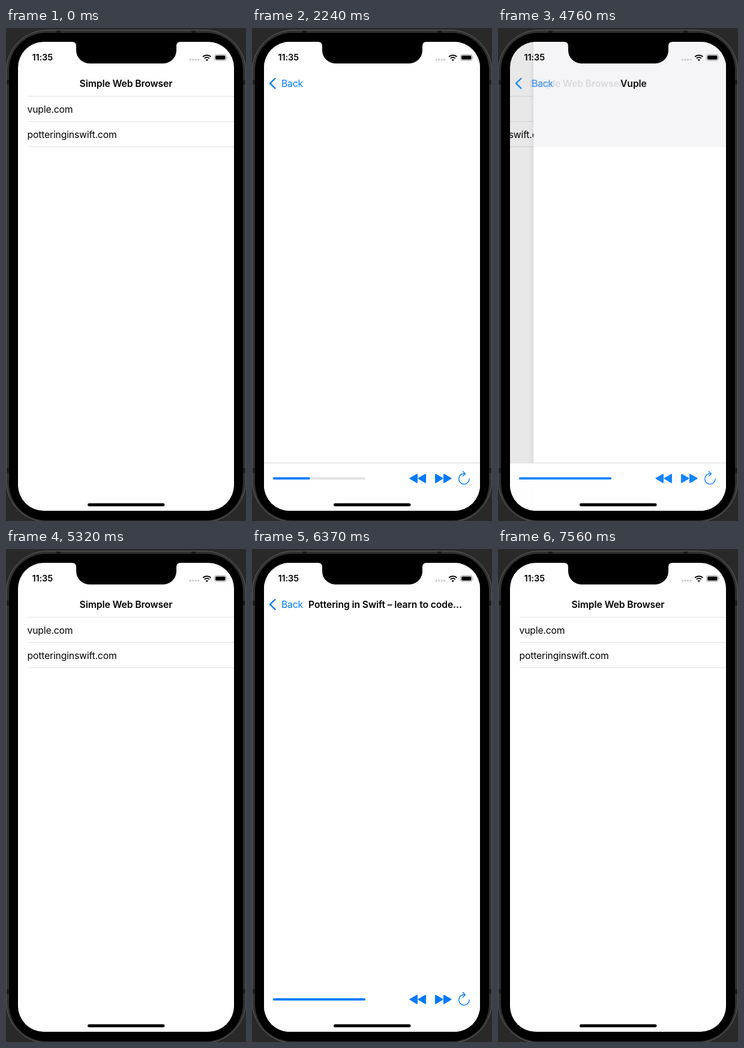
An HTML page that plays this animation: 400 px wide and 820 px high, repeating every 7840 ms.

```html
<!DOCTYPE html>
<html lang="en">
<head>
<meta charset="utf-8">
<title>Simple Web Browser</title>
<style>
  html, body { margin: 0; width: 100%; height: 100%; overflow: hidden; background: #292929; }
  svg { display: block; width: 400px; height: 820px; }
  text { font: 15.7px Inter, "Open Sans", sans-serif; letter-spacing: -.15px; }
  .title { font-weight: 600; letter-spacing: -.1px; }
  .blue { fill: #007aff; }
  .line { stroke: #007aff; fill: none; stroke-linecap: round; stroke-linejoin: round; }
  .rule { fill: #e3e3e5; }
  .h1 { font-size: 44px; font-weight: 700; letter-spacing: -.6px; }
  .lead { font-size: 23px; letter-spacing: -.55px; }
  .brand { font-size: 14.2px; letter-spacing: 0; }
</style>
</head>
<body>
<svg viewBox="0 0 400 820">
  <defs>
    <clipPath id="screen"><rect x="20" y="23" width="360" height="780" rx="43"/></clipPath>
    <clipPath id="photo"><rect x="35" y="615" width="330" height="188"/></clipPath>
    <linearGradient id="night" x2="0" y2="1">
      <stop stop-color="#11161f"/><stop offset=".3" stop-color="#0a2039"/><stop offset="1" stop-color="#0a4687"/>
    </linearGradient>
    <linearGradient id="shade">
      <stop stop-opacity="0"/><stop offset="1" stop-opacity=".05"/>
    </linearGradient>
  </defs>

  <!-- Phone body -->
  <rect width="400" height="820" fill="#292929"/>
  <rect x=".5" y="3.5" width="399" height="818" rx="68" fill="#303030" stroke="#606060"/>
  <path d="M84 4h7v4h-7zM309 4h7v4h-7zM1 86h4v8H1zM395 86h4v8h-4zM1 732h4v8H1zM395 732h4v8h-4z" fill="#1b1b1b"/>
  <rect x="5" y="8" width="390" height="811" rx="62"/>

  <g clip-path="url(#screen)">
    <rect x="20" y="23" width="360" height="780" fill="#fff"/>

    <g id="list">
      <rect class="rule" x="36" y="113" width="344" height="1"/>
      <rect class="rule" x="36" y="155" width="344" height="1"/>
      <rect class="rule" x="36" y="197" width="344" height="1"/>
      <rect id="selection" x="20" width="360" height="43" fill="#d1d1d6"/>
      <text x="35.5" y="140.5">vuple.com</text>
      <text x="35.5" y="182.5">potteringinswift.com</text>
    </g>
    <rect id="dim" x="20" y="23" width="360" height="780"/>

    <g id="page">
      <rect x="12" y="23" width="8" height="780" fill="url(#shade)"/>
      <rect x="20" y="23" width="360" height="780" fill="#fff"/>
      <rect id="siteOne" x="20" y="23" width="360" height="175" fill="#f5f5f7"/>
      <g id="siteTwo">
        <rect x="20" y="23" width="360" height="90" fill="#fafafa"/>
        <rect x="20" y="173" width="360" height="630" fill="url(#night)"/>
        <rect x="20" y="113" width="360" height="61" fill="#b22024"/>
        <rect x="35" y="133" width="24.5" height="11" fill="#1560bd"/>
        <rect x="35" y="144" width="24.5" height="11" fill="#ffd60a"/>
        <g fill="#fff">
          <text class="brand" x="63.5" y="149"><tspan font-weight="700">POTTERING</tspan><tspan font-weight="300"> IN </tspan><tspan font-weight="700">SWIFT</tspan></text>
          <g id="copy"></g>
          <text x="127.5" y="560" style="font-size:19.5px">Search the site</text>
        </g>
        <g fill="none" stroke="#fff" stroke-width="1.3">
          <rect x="76" y="530.5" width="249" height="46" rx="23"/>
          <circle cx="100.5" cy="551.5" r="5.8"/>
          <path d="M104.7 556l5 5"/>
        </g>
        <g clip-path="url(#photo)">
          <rect x="35" y="615" width="330" height="188" fill="#cfae90"/>
          <path d="M35 640h330M35 672h330M35 706h330" stroke="#b9977a"/>
          <path d="M35 648l22 12v50H35z" fill="#8a5a2c"/>
          <path d="M42 640l25 55" stroke="#26364f" stroke-width="5"/>
          <path d="M35 615h82l-16 12 20 4-26 5 7 16-20-10-8 14-8-16-19 9 7-16-19 4z" fill="#22391f"/>
          <path d="M157 633l24-18h184v108H235z" fill="#8f8d8c"/>
          <path d="M181 633l20-18h164v96H245z" fill="#333336"/>
          <path d="M97 677l34-22 52 66-36 30z" fill="#fff" stroke="#202022" stroke-width="4" stroke-linejoin="round"/>
          <circle cx="142" cy="704" r="16" fill="#c1272d"/>
          <ellipse cx="64" cy="730" rx="34" ry="18" fill="#ece7e2"/>
        </g>
      </g>
    </g>

    <!-- Navigation bar -->
    <text id="listTitle" class="title" x="200" y="98" text-anchor="middle">Simple Web Browser</text>
    <path id="chevron" class="line" d="M38.5 84l-8.5 8.2 8.5 8.2" stroke-width="2.3"/>
    <text id="back" class="blue" x="49" y="98">Back</text>
    <text id="pageTitle" class="title" y="98"></text>

    <g id="toolbar">
      <rect x="20" y="723" width="360" height="80" fill="#fff" fill-opacity=".95"/>
      <rect id="toolbarRule" x="20" y="723" width="360" height="1" fill="#d9d9db"/>
      <g id="tools">
        <rect x="35" y="747.3" width="154" height="3.7" rx="1.85" fill="#e1e1e4"/>
        <rect id="bar" class="blue" x="35" y="747.3" height="3.7" rx="1.85"/>
        <path class="line" style="fill:#007aff" stroke-width="2" d="M275 742.5v13.5l-11.5-6.8zM289 742.5v13.5l-11.5-6.8zM306 742.5v13.5l11.5-6.8zM320 742.5v13.5l11.5-6.8z"/>
        <path class="line" stroke-width="1.4" d="M354.5 741.3a8.7 8.7 0 1 0 7.6 8.6M351.5 737.5l4 3.9-4 3.9"/>
      </g>
    </g>

    <!-- Status bar -->
    <text class="title" x="43.5" y="54.3" style="font-size:14.5px">11:35</text>
    <g fill="#c8c8ca">
      <circle cx="307.3" cy="52.7" r="1.6"/><circle cx="311.8" cy="52.7" r="1.6"/>
      <circle cx="316.3" cy="52.7" r="1.6"/><circle cx="320.8" cy="52.7" r="1.6"/>
    </g>
    <path d="M328.2 47.7a9.8 9.8 0 0 1 13.2 0M330.8 50.6a6 6 0 0 1 8 0" fill="none" stroke="#000" stroke-width="2"/>
    <path d="M332.5 52.7q2.3-1.6 4.6 0l-2.3 2.3z"/>
    <rect x="347.5" y="44.2" width="19.5" height="9.8" rx="3" fill="none" stroke="#9a9a9c"/>
    <rect x="349" y="45.7" width="16.5" height="6.8" rx="1.7"/>
    <path d="M368.2 47.5q1.6 1.6 0 3.2z" fill="#9a9a9c"/>
    <rect x="136" y="790.5" width="128.5" height="5" rx="2.5"/>
  </g>
  <path d="M110 22v1q7 0 7 7v7a22 22 0 0 0 22 22h123a22 22 0 0 0 22-22v-7q0-7 7-7v-1z"/>
</svg>

<script>
const LOOP = 7840, STEP = 70;
const TAP_1 = 1400, TITLE_1 = 3430, POP_1 = 4690;
const TAP_2 = 5600, TITLE_2 = 6370, LOADED_2 = 6510, POP_2 = 6930;
// [time, loaded fraction]
const LOADING = [[0, 0], [1820, .1], [2240, .4], [2730, .62], [3080, .9], [3290, .91], [TITLE_1, 1],
                 [TAP_2, 0], [5810, .1], [6160, .4], [6300, .7], [TITLE_2, 1]];
const COPY = [
  ["h1", 36.5, 245, "Learn Swift fast"],
  ["h1", 116.5, 299, "for free"],
  ["lead", 48.5, 334, "With more free Swift tutorials"],
  ["lead", 54.5, 367.5, "than any other site, Pottering"],
  ["lead", 52.5, 401, "in Swift will help you learn"],
  ["lead", 55.5, 434.5, "app development with UIKit"],
  ["lead", 40.5, 468, "and SwiftUI. Search below, or"],
  ["lead", 44.5, 501.5, "choose a learning path here:"],
];

const $ = id => document.getElementById(id);
const set = (id, attrs) => {
  for (const name in attrs) $(id).setAttribute(name, attrs[name]);
};
const shift = x => `translate(${x.toFixed(2)} 0)`;
const show = visible => visible ? "inline" : "none";

$("copy").innerHTML = COPY.map(([style, x, y, words]) =>
  `<text class="${style}" x="${x}" y="${y}">${words}</text>`).join("");

// Critically damped slide, settled after 520 ms
function spring(ms) {
  if (ms <= 0) return 0;
  if (ms >= 520) return 1;
  const a = ms * .014;
  return 1 - (1 + a) * Math.exp(-a);
}

function render(t) {
  const second = t >= TAP_2;
  const popping = t >= POP_2 || (t >= POP_1 && !second);
  const loaded = t >= LOADED_2;
  // How far the page covers the list, 0 to 1
  const cover = spring(t - 1720) - spring(t - 4720) + spring(t - 5690) - spring(t - 6960);
  const away = 1 - cover;

  set("list", { transform: shift(-108 * cover) });
  set("selection", { y: second ? 155 : 113, display: show(t >= TAP_1 && !popping) });
  set("dim", { opacity: .1 * cover });
  set("page", { transform: shift(360 * away), display: show(cover > 0) });
  set("siteOne", { display: show(t >= TITLE_1 && !second) });
  set("siteTwo", { display: show(loaded) });

  set("listTitle", { transform: shift(-78 * cover), opacity: away });
  set("chevron", { opacity: cover });
  set("back", { transform: shift(64 * away), opacity: cover ** 2 });
  const long = t >= TITLE_2;
  $("pageTitle").textContent = long ? "Pottering in Swift – learn to code..."
    : t >= TITLE_1 && !second ? "Vuple" : "";
  set("pageTitle", {
    x: long ? 94 : 200, "text-anchor": long ? "start" : "middle",
    transform: shift(238 * away), opacity: Math.sqrt(cover),
  });

  // The toolbar slides in with the page but fades out in place
  set("toolbar", {
    transform: shift(popping ? 0 : 360 * away),
    opacity: popping ? 1 - away ** 4 : 1,
    display: show(cover > 0),
  });
  set("tools", { opacity: popping ? cover ** .7 : 1 });
  set("toolbarRule", { display: show(!second || loaded) });
  const fraction = LOADING.filter(([time]) => time <= t).pop()[1];
  set("bar", { width: 154 * fraction });
}

const start = performance.now();
function tick() {
  const t = (performance.now() - start) % LOOP;
  render(Math.floor(t / STEP) * STEP);
  requestAnimationFrame(tick);
}
tick();
</script>
</body>
</html>
```
